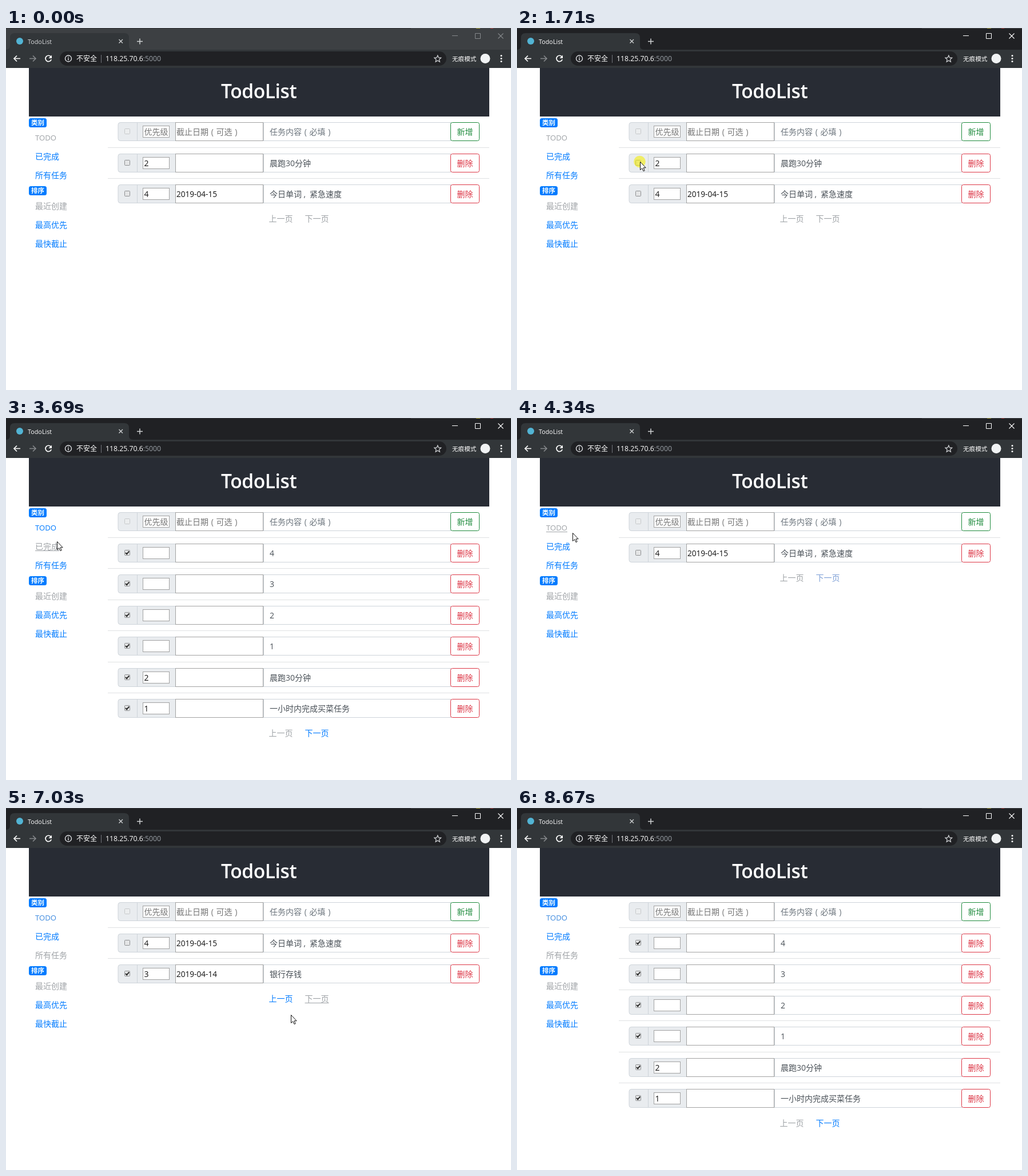
Write an HTML page that moves like this. It is 883 by 634 pixels and loops after 8.74 s.

```html
<!DOCTYPE html>
<html lang="zh-CN">
<head>
<meta charset="utf-8">
<title>TodoList</title>
<style>
html, body { margin: 0; width: 100%; height: 100%; overflow: hidden; background: #fff; }
svg { display: block; width: 883px; height: 634px; }
text { font-family: "Open Sans", "Noto Sans CJK SC", "Noto Sans CJK", sans-serif; white-space: pre; }
</style>
</head>
<body>
<svg id="stage" viewBox="0 0 883 634" xmlns="http://www.w3.org/2000/svg">
  <g id="bar"></g>
  <g id="page"></g>
  <g id="pointer">
    <circle id="glow" cx="-.5" cy="0" r="10.3" fill="#f4ee12" fill-opacity=".62"/>
    <path id="arrow" d="M.5 .5V14.5L3.8 11.6 6 16.6 8.2 15.7 6 10.8H10.2Z" fill="#fff" stroke="#111" stroke-width="1"/>
  </g>
</svg>
<script>
const LOOP = 8740;
const BLUE = '#007bff', HOVER = '#0056b3', GREY = '#9fa3a7', FADE = '#3f8bdf', MIX = '#7d9fd6';
const $ = id => document.getElementById(id);

// Full-width punctuation sits centred in its cell
const spaced = s => s.replace(/（/g, '\u2004(\u2004').replace(/）/g, '\u2004)\u2004')
  .replace(/，/g, '\u2005,\u2002');
const text = (x, y, s, fill, size = 14, extra = '') =>
  `<text x="${x}" y="${y}" font-size="${size}" fill="${fill}" ${extra}>${spaced(s)}</text>`;
const rect = (x, y, w, h, fill, extra = '') =>
  `<rect x="${x}" y="${y}" width="${w}" height="${h}" fill="${fill}" ${extra}/>`;
const box = (x, y, w, h, fill, line, r = 0) =>
  rect(x + .5, y + .5, w - 1, h - 1, fill, `stroke="${line}" rx="${r}"`);
const line = (d, color, w = 1) =>
  `<path d="${d}" fill="none" stroke="${color}" stroke-width="${w}"/>`;
const link = (x, y, s, color, under, w = s.length * 14, size = 14) =>
  text(x, y, s, color, size) + (under ? rect(x, y + 2, w, 1, color) : '');

// Browser chrome
function drawBar(active) {
  const ctl = active ? '#fff' : '#85888b';
  return rect(0, 0, 883, 39, active ? '#202124' : '#3d4043') +
    rect(0, 0, 883, 1, '#303236') + rect(708, 0, 175, 1, '#484b4f') +
    rect(822, 0, 7, 1, '#a6a23c') + rect(847, 0, 5, 1, '#b04a4a') +
    '<path d="M0 38Q7 38 7 31V17Q7 9 15 9H207Q215 9 215 17V31Q215 38 222 38Z" fill="#323639"/>' +
    rect(0, 38, 883, 32, '#323639') +
    '<circle cx="24" cy="23" r="6" fill="#52b4d4"/>' +
    text(38, 27.5, 'TodoList', active ? '#fff' : '#d8dadc', 10.8) +
    line('M197.5 20l6.5 6.5M204 20l-6.5 6.5', '#d0d2d4', 1.3) +
    line('M229 23.5h10M234 18.5v10', '#d0d2d4', 1.5) +
    line('M780 13.5h10', ctl) + line('M820.5 9.5h9v9h-9z', ctl) +
    line('M860.5 9.5l9 9M869.5 9.5l-9 9', ctl, 1.1) +
    line('M25 53.5H14M19 48.5l-5 5 5 5', '#fff', 1.7) +
    line('M41 53.5H52M47 48.5l5 5-5 5', '#84878a', 1.7) +
    line('M78.6 50.6A5.2 5.2 0 1 0 79.2 55', '#fff', 1.7) +
    '<path d="M80 47.5V53H74.5Z" fill="#fff"/>' +
    rect(94, 41, 676, 25, '#202124', 'rx="12.5"') +
    '<circle cx="109" cy="53.5" r="5.5" fill="none" stroke="#e8eaed" stroke-width="1.3"/>' +
    rect(108.3, 52.6, 1.4, 4, '#e8eaed') + rect(108.3, 50.2, 1.4, 1.4, '#e8eaed') +
    text(123, 58, '不安全', '#fff', 12) + rect(166, 47, 1, 14, '#70747a') +
    text(174, 58, '118.25.70.6<tspan fill="#9aa0a6">:5000</tspan>', '#fff', 12.25) +
    '<path d="M754.8 48l1.7 3.9 4.2.4-3.2 2.8.9 4.1-3.6-2.2-3.6 2.2.9-4.1-3.2-2.8 4.2-.4z" fill="none" stroke="#d5d7da" stroke-width="1.2"/>' +
    text(780, 58, '无痕模式', '#fff', 10.6) +
    '<circle cx="838" cy="53.5" r="8.5" fill="#f1f3f4"/>' +
    [48.5, 53.5, 58.5].map(y => `<circle cx="866" cy="${y}" r="1.5" fill="#fff"/>`).join('') +
    rect(40, 70, 805, 85, '#282c34') +
    text(376, 123, 'TodoList', '#fff', 33.5, 'font-weight="600" letter-spacing="-.4"');
}

const task = (level, date, body, done) => ({ level, date, body, done });
const run = done => task('2', '', '晨跑30分钟', done);
const words = task('4', '2019-04-15', '今日单词，紧急速度', false);
const finished = [...['4', '3', '2', '1'].map(n => task('', '', n, true)),
  run(true), task('1', '', '一小时内完成买菜任务', true)];
const lastPage = [words, task('3', '2019-04-14', '银行存钱', true)];
const entry = { level: '优先级', date: '截止日期（可选）', body: '任务内容（必填）' };

function drawRow(item, i) {
  const head = item === entry, y = Math.round(165 + 54.5 * i), base = y + 22;
  const tone = head ? '#1e8a3c' : '#dc3545', field = head ? '#757575' : '#111';
  return (head ? '' : rect(178, y - 11, 667, 1, '#dfe1e3')) +
    `<path d="M296.5 ${y + .5}H200a4 4 0 0 0-4 4v24a4 4 0 0 0 4 4h96.5z" fill="#e9ecef" stroke="#ced4da"/>` +
    rect(229, y, 1, 33, '#ced4da') +
    box(207, y + 11, 10, 10, head ? '#eceeef' : '#e4e5e6', head ? '#c6c8ca' : '#8d8f91', 1) +
    (item.done ? line(`M209 ${y + 16}l2.2 2.4 4-5`, '#222', 1.9) : '') +
    box(239, y + 6, 47, 21, '#fff', '#a2a2a2') +
    text(241.5, base, item.level, field) +
    box(450, y, 328, 33, '#fff', '#ced4da') +
    box(296, y, 154, 33, '#fff', '#a2a2a2') +
    text(298, base, item.date, field, head ? 14 : 13.6) +
    text(461, base, item.body, head ? '#6c757d' : '#495057') +
    box(777, y, 51, 33, '#fff', tone, 3) +
    text(788.5, base, head ? '新增' : '删除', tone);
}

const badge = (y, s) => rect(40, y, 31, 16, BLUE, 'rx="3.5"') +
  text(44, y + 12.3, s, '#fff', 11.5, 'font-weight="700"');

const within = (t, a, b) => t >= a && t < b;

// Everything below the header at time t
function drawPage(t) {
  const view = t < 3002 ? 'todo' : t < 4249 ? 'done' : t < 5029 ? 'todo' : 'all';
  const second = within(t, 6423, 7268);
  const rows = t < 1857 ? [run(t >= 1783), words] : view === 'todo' ? [words]
    : second ? lastPage : finished;
  const py = Math.round(165 + 54.5 * rows.length) + 65;
  const tone = (name, under, idle = BLUE) => view === name ? GREY : under ? HOVER : idle;

  const uTodo = within(t, 3853, 4485);
  const uDone = within(t, 2625, 3081) || within(t, 3617, 3853);
  const uAll = within(t, 4642, 6423);
  const uNext = within(t, 6200, 7268);

  const prev = second ? BLUE : within(t, 7268, 8670) ? MIX : GREY;
  const next = view === 'todo' ? (within(t, 4249, 4406) ? MIX : GREY)
    : second ? GREY : within(t, 3002, 3230) ? FADE : uNext ? HOVER : BLUE;

  return badge(158, '类别') +
    link(51, 197, 'TODO', tone('todo', uTodo, view === 'all' ? FADE : BLUE), uTodo, 37, 13.1) +
    link(51, 230, '已完成', tone('done', uDone), uDone) +
    link(51, 263, '所有任务', tone('all', uAll), uAll) +
    badge(277, '排序') +
    link(51, 317, '最近创建', GREY) +
    link(51, 350, '最高优先', BLUE) +
    link(51, 383, '最快截止', BLUE) +
    [entry, ...rows].map(drawRow).join('') +
    link(459.5, py, '上一页', prev) +
    link(522.5, py, '下一页', next, uNext);
}

// Pointer path: time, x, y
const path = [
  [220, 819, 609], [455, 400, 430], [690, 53, 420], [925, 190, 181], [1080, 172, 231],
  [1140, 172, 231], [1300, 234, 226], [1550, 215, 234], [2310, 215, 234],
  [2625, 75, 228], [3002, 75, 228], [3160, 160, 235], [3460, 160, 235],
  [3696, 89, 216], [4010, 92, 194], [4249, 92, 194], [4327, 97, 201],
  [4642, 100, 254], [5108, 100, 254], [5741, 701, 590], [5820, 701, 604],
  [5968, 690, 616], [6200, 540, 545], [6350, 540, 545], [6570, 540, 541],
  [6800, 540, 541], [7034, 498, 363], [7112, 482, 336], [7268, 482, 336],
  [7580, 583, 389], [7680, 583, 389], [8360, 849, 640]
];
const clicks = [1710, 2704, 4170, 4950, 6350, 7112];
const STEP = 78.5;
const bursts = [220, 1140, 2310, 3460, 4170, 4950, 5890, 6350, 6800, 7680];

// The pointer is sampled at a steady rate inside each burst of movement
function snap(t) {
  let start = 0;
  for (const b of bursts) if (t >= b) start = b;
  return start + Math.floor((t - start) / STEP + .15) * STEP;
}

function pointerAt(t) {
  let i = 0;
  while (i < path.length - 2 && t >= path[i + 1][0]) i++;
  const [a, x, y] = path[i], [b, u, v] = path[i + 1];
  const k = Math.min(1, Math.max(0, (t - a) / (b - a)));
  return [x + (u - x) * k, y + (v - y) * k];
}

let lastBar = '', lastMarkup = '';
function render(t) {
  const bar = drawBar(t >= 1710), page = drawPage(t);
  if (bar !== lastBar) $('bar').innerHTML = lastBar = bar;
  if (page !== lastMarkup) $('page').innerHTML = lastMarkup = page;
  const [x, y] = pointerAt(snap(t));
  $('pointer').setAttribute('transform', `translate(${Math.round(x)} ${Math.round(y)})`);
  $('pointer').setAttribute('visibility', within(t, 220, 8360) ? 'visible' : 'hidden');
  $('glow').setAttribute('opacity', clicks.some(c => within(t, c, c + 150)) ? 1 : 0);
}

const begin = performance.now();
function tick() {
  render((performance.now() - begin) % LOOP);
  requestAnimationFrame(tick);
}
render(0);
requestAnimationFrame(tick);
</script>
</body>
</html>
```
